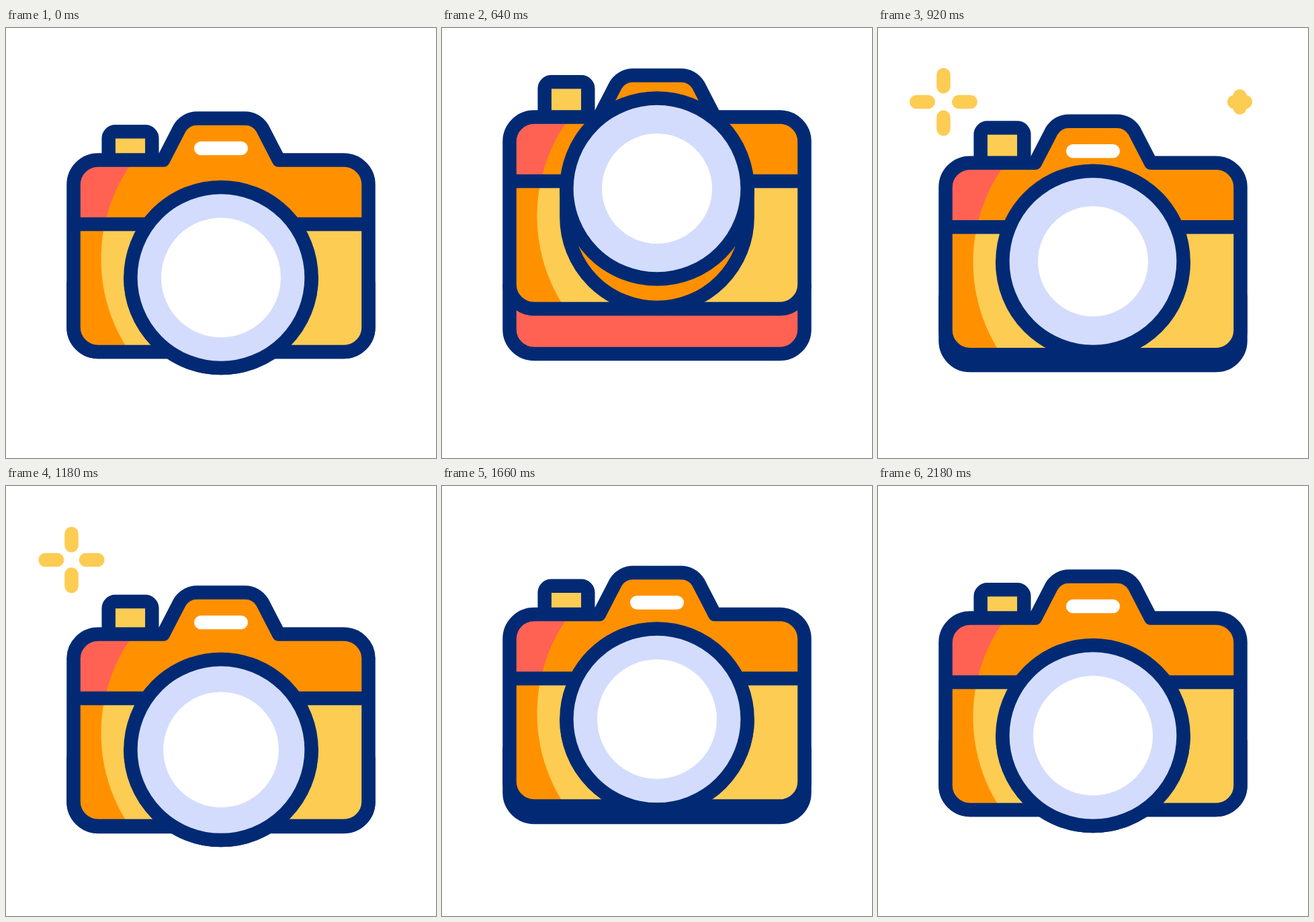
Write an HTML page that moves like this. It is 640 px wide and 640 px high and loops after 2.44 s.

```html
<!DOCTYPE html>
<html>
<head>
<meta charset="utf-8">
<style>
html, body { margin: 0; width: 100%; height: 100%; overflow: hidden; background: #fff; }
svg { display: block; width: 100vw; height: 100vh; }
.line { stroke: #022a74; stroke-width: 20.5; stroke-linejoin: round; }
.spark { fill: none; stroke: #fdcc52; stroke-width: 20.5; stroke-linecap: round; }
</style>
</head>
<body>
<svg viewBox="0 0 640 640">
  <defs>
    <path id="shell" d="M137 196.5H234L258.5 149A30 30 0 0 1 285 134.5H355A30 30 0 0 1 381.5 149L406 196.5H503A36.5 36.5 0 0 1 539.5 233V445.5A36.5 36.5 0 0 1 503 482H137A36.5 36.5 0 0 1 100.5 445.5V233A36.5 36.5 0 0 1 137 196.5Z"/>
    <clipPath id="inShell"><use href="#shell"/></clipPath>
    <clipPath id="lit"><circle cx="388.5" cy="344" r="247"/></clipPath>
  </defs>
  <path id="base" class="line" fill="#ff6253" d="M100.5 380V445.5A36.5 36.5 0 0 0 137 482H503A36.5 36.5 0 0 0 539.5 445.5V380Z"/>
  <rect id="button" class="line" fill="#fdcc52" x="152.7" y="154.3" width="64.6" height="60" rx="10"/>
  <g id="body">
    <g clip-path="url(#inShell)">
      <rect width="640" height="292" fill="#ff6253"/>
      <rect y="292" width="640" height="200" fill="#ff9100"/>
      <g clip-path="url(#lit)">
        <rect width="640" height="292" fill="#ff9100"/>
        <rect y="292" width="640" height="200" fill="#fdcc52"/>
      </g>
    </g>
    <path class="line" d="M100.5 292H539.5"/>
    <use href="#shell" class="line" fill="none"/>
    <path d="M290.2 179H349.8" stroke="#fff" stroke-width="20.5" stroke-linecap="round"/>
  </g>
  <path id="barrel" class="line" fill="#ff9100"/>
  <g id="lens">
    <circle class="line" cx="320" cy="371.5" r="134.6" fill="#d3dcfd"/>
    <circle id="glass" cx="320" cy="371.5" fill="#fff"/>
  </g>
  <path id="sparkL" class="spark" transform="translate(97.5 110)"/>
  <path id="sparkR" class="spark" transform="translate(538.5 110)"/>
</svg>
<script>
const LOOP = 2440, LENS_Y = 371.5;
const $ = id => document.getElementById(id);
const shift = (id, y) => $(id).setAttribute("transform", `translate(0 ${y})`);

// Progress from 0 to 1 between two times: smooth at both ends, or only slowing down
const part = (t, from, to) => Math.min(1, Math.max(0, (t - from) / (to - from)));
const smooth = (t, from, to) => { const u = part(t, from, to); return u * u * (3 - 2 * u); };
const slowing = (t, from, to) => Math.sin(part(t, from, to) * Math.PI / 2);

// Four rays shoot outwards and return, once for each start time
function spark(id, starts, t) {
  const half = 134;
  const start = starts.find(s => t > s && t < s + 2 * half);
  if (start === undefined) return $(id).setAttribute("d", "");
  const u = (t - start) / half - 1;
  const far = 42.5 * (1 - u * u), near = Math.max(0, far - 17.5);
  $(id).setAttribute("d", `M${near} 0H${far}M${-near} 0H${-far}M0 ${near}V${far}M0 ${-near}V${-far}`);
}

function draw(t) {
  const jump = smooth(t, 200, 640);
  const hop = smooth(t, 1290, 1540);
  const land = slowing(t, 1540, 1820);
  const settle = smooth(t, 1820, 2180);
  const press = smooth(t, 1080, 1425);
  const release = smooth(t, 1425, 1620);

  const body = -64 * jump + 88 * slowing(t, 670, 1115) - 59 * hop + 47 * land - 12 * settle;
  const base = 25 * slowing(t, 600, 1140) - 16.5 * hop + 4 * land - 12.5 * settle;
  const lens = 68.5 * (slowing(t, 670, 1300) - jump) + 19 * (smooth(t, 1820, 1980) - hop);

  shift("body", body);
  shift("base", base);
  shift("button", body - 10 * jump + 18 * press - 8 * release);
  shift("lens", body + lens);
  $("glass").setAttribute("r", 89 - 7 * jump + 19 * press - 12 * release);

  // The barrel follows the lens until it is fully out
  const top = LENS_Y + body + lens, bottom = LENS_Y + body + Math.max(lens, -26);
  $("barrel").setAttribute("d", `M185.4 ${top}V${bottom}A134.6 134.6 0 0 0 454.6 ${bottom}V${top}Z`);

  spark("sparkL", [818, 1086], t);
  spark("sparkR", [907, 1190], t);
}

const begin = performance.now();
function tick() {
  draw((performance.now() - begin) % LOOP);
  requestAnimationFrame(tick);
}
tick();
</script>
</body>
</html>
```
